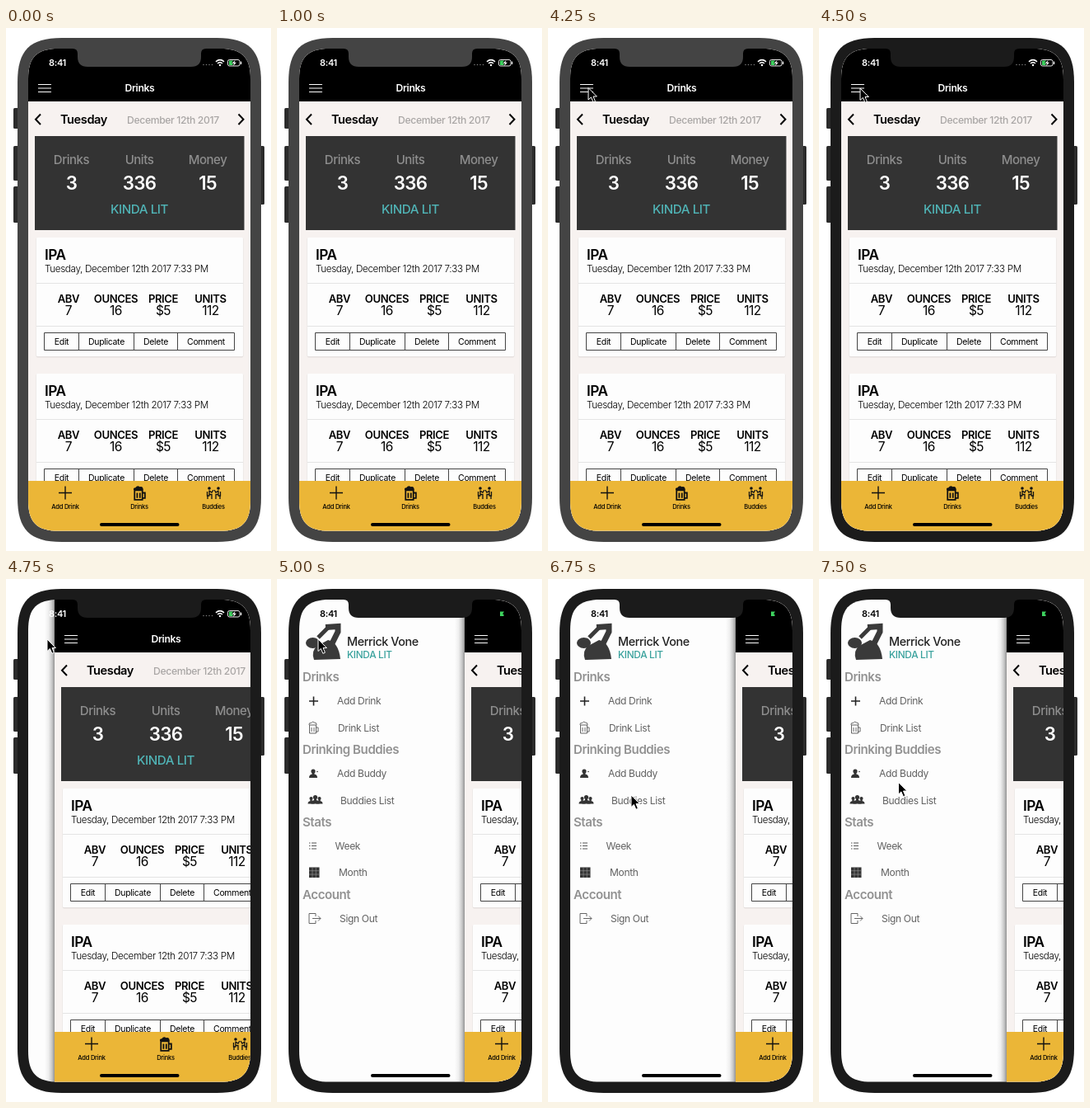
These frames come from a looping animation (322 by 634 pixels, 8000 ms). An HTML page:

```html
<!DOCTYPE html>
<html lang="en">
<head>
<meta charset="utf-8">
<title>Drinks</title>
<style>
  html, body { margin: 0; width: 100%; height: 100%; overflow: hidden; background: #fff; }
  svg { display: block; width: 100%; height: 100%; }
  text { font-family: Inter, "Liberation Sans", sans-serif; letter-spacing: -.03em; }
</style>
</head>
<body>
<svg id="stage" viewBox="0 0 322 634"></svg>
<script>
const LOOP = 8000;
const stage = document.getElementById('stage');

const label = (x, y, str, size, weight = 400, fill = '#000', anchor = 'start') =>
  `<text x="${x}" y="${y}" font-size="${size}" font-weight="${weight}" fill="${fill}" text-anchor="${anchor}">${str}</text>`;
const centered = (x, y, str, size, weight, fill) => label(x, y, str, size, weight, fill, 'middle');
const box = (x, y, w, h, fill, r = 0, extra = '') =>
  `<rect x="${x}" y="${y}" width="${w}" height="${h}" rx="${r}" fill="${fill}" ${extra}/>`;
const line = (d, color = '#000', width = 1) =>
  `<path d="${d}" fill="none" stroke="${color}" stroke-width="${width}"/>`;
const shape = (d, fill = '#333') => `<path d="${d}" fill="${fill}"/>`;
const dot = (x, y, r, fill = '#333') => `<circle cx="${x}" cy="${y}" r="${r}" fill="${fill}"/>`;
const at = (x, y, content, scale = 1) => `<g transform="translate(${x} ${y}) scale(${scale})">${content}</g>`;

// Rectangle with continuous corners: the curve starts earlier than a circular arc
function squircle(x, y, w, h, r) {
  const e = 1.28 * r, c = .355 * r, k = e - c;
  return `M${x} ${y + e}c0 ${-k} ${k} ${-e} ${e} ${-e}`.replace(/c.*/, '') +
    `C${x} ${y + c} ${x + c} ${y} ${x + e} ${y}H${x + w - e}` +
    `C${x + w - c} ${y} ${x + w} ${y + c} ${x + w} ${y + e}V${y + h - e}` +
    `C${x + w} ${y + h - c} ${x + w - c} ${y + h} ${x + w - e} ${y + h}H${x + e}` +
    `C${x + c} ${y + h} ${x} ${y + h - c} ${x} ${y + h - e}Z`;
}

const summary = () => box(35, 131, 254.5, 114, '#333') +
  [['Drinks', '3', 79.5], ['Units', '336', 162], ['Money', '15', 245]].map(([name, value, x]) =>
    centered(x, 165, name, 15, 500, '#8e8e8e') + centered(x, 196, value, 22.3, 600, '#fff')).join('') +
  centered(162, 225, 'KINDA LIT', 15.2, 500, '#50b4b6');

const card = y => at(0, y,
  box(36.5, 0, 252, 145.5, '#e6e1df', 2) + box(37, 0, 251, 144, '#fdfdfd', 1) +
  label(47, 26.5, 'IPA', 17.3, 600) +
  label(47, 42, 'Tuesday, December 12th 2017 7:33 PM', 11.7, 300) +
  line('M37 55.5H288M37 107.5H288', '#e4e4e4') +
  [['ABV', '7', 76], ['OUNCES', '16', 133.5], ['PRICE', '$5', 191], ['UNITS', '112', 248.5]].map(([name, value, x]) =>
    centered(x, 78.5, name, 13.1, 600) + centered(x, 94, value, 15.5)).join('') +
  line('M46.5 115.5H277.5V136.5H46.5ZM88.5 115.5V136.5M155.5 115.5V136.5M208.5 115.5V136.5', '#444') +
  [['Edit', 67.5], ['Duplicate', 122], ['Delete', 182], ['Comment', 243]].map(([name, x]) =>
    centered(x, 129.5, name, 10.5)).join(''));

const mug = (color, width) =>
  line('M-5 -3H4V8H-5ZM4 0H7V6H4M-2 0V6M1.2 0V6', color, width) +
  shape('M-6 -3Q-7 -6 -4 -6Q-2 -9 1 -7Q5 -8 5 -3Z', color);

const drinker = dot(-5.5, -5, 1.8, '#111') +
  line('M-5.5 -2.5V2.5H-2.5V8M-5.5 -2L-2.5 0L-.6 -3M-8 -1V4H-5M-7.5 4V8', '#111', 1.3);

const tabs = () => box(27, 549, 270, 61, '#ebb637') +
  line('M64 563.5H80M72 555.5V571.5', '#111', 1.4) +
  at(161.5, 563.5, mug('#111', 1.7), 1.05) +
  at(252.5, 563, drinker + `<g transform="scale(-1 1)">${drinker}</g>`) +
  [['Add Drink', 72], ['Drinks', 162], ['Buddies', 252]].map(([name, x]) =>
    centered(x, 582.5, name, 7.5, 500)).join('');

const app = () => box(27, 25, 270, 585, '#f7f2f0') +
  box(15, 25, 12, 585, 'url(#shade)') +
  box(27, 25, 270, 64, '#000') +
  line('M39 68.5H55M39 73H55M39 77.5H55', '#fff', 1.2) +
  centered(162.5, 77, 'Drinks', 12.2, 600, '#fff') +
  line('M42 104.5L36 110.7L42 117M282.5 104.5L288.5 110.7L282.5 117', '#000', 2) +
  label(66, 116, 'Tuesday', 14.6, 600) +
  label(147, 115.5, 'December 12th 2017', 12.2, 500, '#a9a6a5') +
  summary() + card(254) + card(419) + tabs();

const person = dot(0, -3, 2.6) + shape('M-5 5Q-5 1 -1.5 .8V-1H1.5V.8Q5 1 5 5Z');

const menuIcons = () =>
  line('M39 148H50M44.5 142.5V153.5', '#222', 1.6) +
  at(43.5, 180, line('M-4 -3H4V7H-4ZM4 0H6.5V5H4M-1.5 0V5M1.5 0V5M-4.5 -3Q-5 -6 -2 -5.5Q0 -8 2 -6Q5 -6 4.5 -3', '#555', .9)) +
  at(44, 236, person + dot(5, -2.5, .8)) +
  at(41.5, 268.5, person, .8) + at(51.5, 268.5, person, .8) + at(46.5, 267.5, person) +
  line('M39 320H40.5M39 323.5H40.5M39 327H40.5M42 320H48M42 323.5H48M42 327H48', '#555', 1) +
  box(39, 349.5, 12.5, 12.5, '#333') +
  line('M43 349.5V362M47.3 349.5V362M39 353.7H51.5M39 358H51.5', '#999', .6) +
  line('M47 409V405.5H39V417.5H47V414M43 411.5H53M50 408.5L53 411.5L50 414.5', '#666', 1);

// Silhouette with the head tipped back and one arm lifting a bottle
const avatar = () =>
  shape('M45 98Q41 87 49 81L62 74Q75 77 77 97Z', '#3a3a3a') +
  '<ellipse cx="43.5" cy="77.5" rx="8.5" ry="6.5" fill="#3a3a3a"/>' +
  line('M50 71L62 59', '#3a3a3a', 5) + line('M59 58.5L74 57.5L74 64L66 80', '#3a3a3a', 7);

const menu = () => avatar() +
  label(85, 81, 'Merrick Vone', 14.4, 500, '#222') +
  label(85, 96, 'KINDA LIT', 11.9, 500, '#38a19c') +
  [['Drinks', 124], ['Drinking Buddies', 212], ['Stats', 300], ['Account', 387.5]].map(([name, y]) =>
    label(31, y, name, 15.1, 600, '#929292')).join('') +
  [['Add Drink', 73, 152], ['Drink List', 74, 185], ['Add Buddy', 73, 240], ['Buddies List', 77, 272.5],
   ['Week', 70.5, 328], ['Month', 75, 360], ['Sign Out', 76, 416]].map(([name, x, y]) =>
    label(x, y, name, 12.1, 400, '#626262')).join('') + menuIcons();

const statusBar = () => centered(62.5, 46, '8:41', 11, 600, 'currentColor') +
  `<g id="signal">${[240, 243.5, 247, 250.5].map(x => dot(x, 44.5, .8, '#777')).join('')}` +
  line('M255 40.8Q260 36.6 265 40.8M257 43Q260 40.6 263 43', 'currentColor', 1.6) +
  dot(260, 45, 1.2, 'currentColor') + '</g>' +
  box(269.5, 38.5, 14.5, 7.5, 'none', 2, 'stroke="currentColor" stroke-width=".9"') +
  box(285, 40.5, 1.2, 3.5, 'currentColor', .5) +
  shape('M271 39.5H276L274 42.5H275.5V45H271Z', '#3ed35f') +
  shape('M278.5 39L274.5 42.8H277L276 46L280 41.8H277.5Z', 'currentColor');

stage.innerHTML = `
  <defs>
    <clipPath id="screen"><path d="${squircle(27, 25, 270, 584.5, 29)}"/></clipPath>
    <linearGradient id="shade">
      <stop offset="0" stop-opacity="0"/><stop offset=".4" stop-opacity=".06"/>
      <stop offset=".75" stop-opacity=".22"/><stop offset="1" stop-opacity=".42"/>
    </linearGradient>
  </defs>
  <g id="frame">
    ${[[9, 97, 25], [9, 143, 42], [9, 192, 44], [305, 143, 71]].map(([x, y, h]) => box(x, y, 9, h, '#2b2b2b', 1.5)).join('')}
    ${shape(squircle(14, 12, 296, 611, 42), 'currentColor')}
  </g>
  <g clip-path="url(#screen)">
    ${box(27, 25, 270, 585, '#fdfdfd')}
    <g id="menu">${menu()}</g>
    <g id="app">${app()}</g>
    <g id="status">${statusBar()}</g>
    ${box(114, 600, 96.5, 4, '#000', 2)}
  </g>
  <path id="notch" fill="currentColor" d="M81 24V25Q87 25 87 31V35C87 43 91 47 99 47H225C233 47 237 43 237 35V31Q237 25 243 25V24Z"/>
  <path id="cursor" fill="#000" stroke="#fff" stroke-width="1" d="M0 0V14.5L3.4 11.4L5.9 17.3L8.4 16.2L6 10.5H10.4Z"/>`;

const part = Object.fromEntries(['menu', 'app', 'status', 'signal', 'frame', 'notch', 'cursor']
  .map(id => [id, document.getElementById(id)]));

// Pointer stops: time, x, y
const pointer = [
  [3750, 123, 52], [4000, 85.5, 65], [4250, 49, 72.5], [4500, 50, 73], [5500, 74.5, 88], [5750, 80, 117],
  [6000, 90, 171.5], [6250, 101.5, 223.5], [6500, 98.5, 249], [6750, 101, 262], [7000, 100.5, 265.5],
  [7250, 97.5, 253.5], [7500, 96.5, 246.5]
];
const drawer = [[0, 0], [4750, 32], [5000, 201]];
const held = (steps, t) => steps.filter(step => step[0] <= t).pop();

function render(t) {
  const open = t >= 5000;
  const bezel = t >= 4500 ? '#1b1b1b' : '#444';
  const shift = held(drawer, t)[1];
  part.app.setAttribute('transform', `translate(${shift} 0)`);
  part.menu.style.display = open ? '' : 'none';
  part.signal.style.display = open ? 'none' : '';
  part.status.style.color = open ? '#000' : '#fff';
  part.frame.style.color = part.notch.style.color = bezel;

  const spot = held(pointer, t);
  part.cursor.style.display = spot ? '' : 'none';
  if (spot) part.cursor.setAttribute('transform', `translate(${spot[1]} ${spot[2]})`);
}

const start = performance.now();
function tick() {
  render((performance.now() - start) % LOOP);
  requestAnimationFrame(tick);
}
render(0);
requestAnimationFrame(tick);
</script>
</body>
</html>
```
